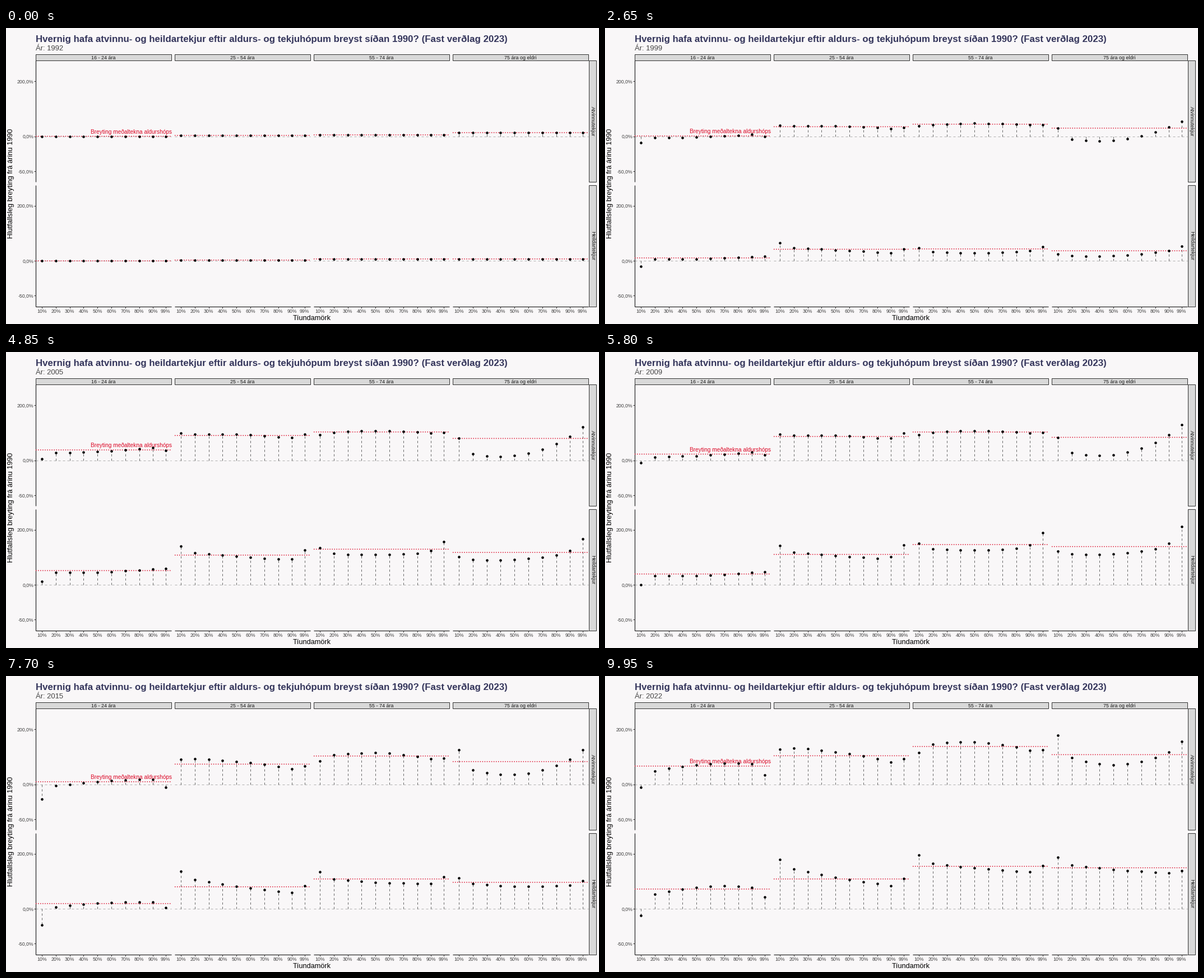
A matplotlib script that plays this animation: 1058x529 px, repeating every 10 s.

```python
import numpy as np
import matplotlib.pyplot as plt
from matplotlib.animation import FuncAnimation
from matplotlib.collections import LineCollection
from matplotlib.patches import Rectangle

W, H, DPI = 1058, 529, 72          # at 72 dpi one point is one pixel
FRAMES, INTERVAL = 200, 50
BG, RED, NAVY, GREY = "#f9f7f8", "#dc0a28", "#35365c", "#444444"

LEFT, PITCH, PANEL_W, PANEL_H = 53, 248, 242.4, 217
TOPS, ZEROS = (58, 281), (194, 416.2)
BOTTOM = TOPS[1] + PANEL_H
LOG_UNIT = 89.8                    # pixels per unit of ln(1 + change)
PCT = np.array([*range(10, 100, 10), 99])
DOT_X = 64 + 2.481 * (PCT - 10)
AGES = ("16 - 24 ára", "25 - 54 ára", "55 - 74 ára", "75 ára og eldri")
KINDS = ("Atvinnutekjur", "Heildartekjur")

plt.rcParams["font.family"] = "Liberation Sans"
fig = plt.figure(figsize=(W / DPI, H / DPI), dpi=DPI, facecolor=BG)
ax = fig.add_axes([0, 0, 1, 1])
ax.set_xlim(0, W)
ax.set_ylim(H, 0)
ax.axis("off")


def profile(low, p20, p50, p90, top):
    """Decile offsets from the mean: free ends, a parabola in between."""
    inner = np.polyfit([20, 50, 90], [p20, p50, p90], 2)
    y = np.polyval(inner, PCT)
    y[0], y[-1] = low, top
    return y


class Panel:
    """One facet: a mean over time and a decile shape that turns early to late."""
    KEYS = (0, 33, 75, 116, 154, 172, 199)

    def __init__(self, row, col, mean, early, late, surge=0):
        self.row, self.col, self.mean, self.surge = row, col, mean, surge
        self.early, self.late = profile(*early), profile(*late)
        self.x0, self.zero = LEFT + col * PITCH, ZEROS[row]
        self.x = DOT_X + col * PITCH

    def state(self, t):
        """Heights above the zero line in pixels: the mean, then the deciles."""
        swing = np.interp(t, [0, 14, 33, 75, 104, 116, 128, 154],
                          [0, -3, 0, 0, 9, 0, -8, 0])
        mean = np.interp(t, self.KEYS, self.mean)
        mean += swing * (1.2, 1, 1, .8)[self.col]
        late = np.interp(t, [116, 154, 199], [0, .6, 1])
        early = min(t / 75, 1) - late
        y = mean + early * self.early + late * self.late
        boom = max(0, 1 - abs(t - 116) / 40)
        y[-2:] += self.surge * boom * np.array([.25, 1])
        if self.col == 0:
            # the lowest young earners fall furthest in bad years
            dip = np.interp(t, [0, 21, 33, 116, 126, 154, 172, 188, 199],
                            [0, -18, -5, -5, -60, -15, 0, -53, -17])
            y[0] += dip * (.75, 1)[self.row]
        return mean, y


panels = [
    Panel(0, 0, (.5, -7, 10, 11.5, 5, 25.5, 33),
          (-12, -5, -3, 4, -1), (-25, -9, 2, 4, -16)),
    Panel(0, 1, (2, 4.5, 32, 43, 36.5, 48.5, 51.5),
          (4, 2, 2, -5, -2), (12, 14, 7, -11, -5), 8),
    Panel(0, 2, (3, 9, 36.5, 51, 51, 64.5, 68),
          (-5, -1, 2, -2, -1), (-11, 4, 8, -7, -6)),
    Panel(0, 3, (7, 5.5, 25.5, 41.5, 41, 50.5, 53.5),
          (0, -28, -31, 3, 17), (35, -6, -18, 4, 24), 6),
    Panel(1, 0, (0, -3.5, 15, 19.5, 9.5, 28, 35.5),
          (-14, -3, -3, 3, 4), (-30, -9, 3, 3, -14)),
    Panel(1, 1, (1.5, 6, 37, 54.5, 39.5, 51, 53.5),
          (16, 4, -2, -9, 0), (35, 18, 3, -12, 1), 17),
    Panel(1, 2, (3.5, 5, 39.5, 72, 53.5, 69.5, 76),
          (2, -8, -10, -5, 6), (20, 5, -3, -10, 1), 15),
    Panel(1, 3, (3.5, 3.5, 34, 68.5, 47.5, 69.5, 73.5),
          (-8, -13, -13, 0, 12), (19, 5, -3, -9, -5), 24),
]


def line(x, y, color="black", lw=1.0, **kw):
    ax.plot(x, y, color=color, lw=lw, solid_capstyle="butt",
            dash_capstyle="butt", **kw)


def strip(x, y, w, h, label, size, rotation=0):
    ax.add_patch(Rectangle((x, y), w, h, fc="#d9d9d9", ec="#333333", lw=1))
    va = "center" if rotation else "center_baseline"
    ax.text(x + w / 2, y + h / 2, label, size=size, color="#1a1a1a",
            ha="center", va=va, rotation=rotation)


# Fixed parts
ax.text(LEFT, 24.5, "Hvernig hafa atvinnu- og heildartekjur eftir aldurs- og "
        "tekjuhópum breyst síðan 1990? (Fast verðlag 2023)",
        size=16.87, weight="bold", color=NAVY)
ax.text(546, 522.5, "Tíundamörk", size=12.8, ha="center")
ax.text(9, 278, "Hlutfallsleg breyting frá árinu 1990", size=12.9,
        rotation=90, ha="center", va="center")

for col, age in enumerate(AGES):
    x0 = LEFT + col * PITCH
    x1 = x0 + PANEL_W
    strip(x0, 47, PANEL_W, 11, age, 8.9)
    line([x0, x1], [BOTTOM, BOTTOM])
    for zero in ZEROS:
        line([x0, x1], [zero, zero], "#b0b0b0", ls=(0, (4, 4)))
    for p, x in zip(PCT, DOT_X + col * PITCH):
        line([x, x], [BOTTOM, BOTTOM + 3], "#333333")
        ax.text(x, 509, f"{p}%", size=8.8, color=GREY, ha="center")

for kind, top, zero in zip(KINDS, TOPS, ZEROS):
    strip(1040, top, 13, PANEL_H, kind, 9.3, 270)
    line([LEFT, LEFT], [top, top + PANEL_H])
    for change in (200, 0, -50):
        y = zero - LOG_UNIT * np.log1p(change / 100)
        line([LEFT - 3, LEFT], [y, y], "#333333")
        ax.text(49, y + 3.2, f"{change},0%", size=8.8, color=GREY, ha="right")

# Moving parts
year = ax.text(LEFT, 40.5, "", size=13, color=GREY)
stems = LineCollection([], colors="#555555", linewidths=.9,
                       linestyles=[(0, (4.4, 4.4))], zorder=3)
means = LineCollection([], colors=RED, linewidths=1.5,
                       linestyles=[(0, (1, 1.7))], zorder=4)
means.set_snap(False)
ax.add_collection(stems, autolim=False)
ax.add_collection(means, autolim=False)
note = ax.text(296, 0, "Breyting meðaltekna aldurshóps", size=10.15,
               color=RED, ha="right", zorder=5)
dots, = ax.plot([], [], "o", color="black", ms=4.6, mew=0, zorder=6)
dots.set_snap(False)


def update(t):
    # seven frames a year up to 2006, then six
    now = 1992 + t // 7 if t < 98 else 2006 + (t - 98) // 6
    year.set_text(f"Ár: {now}")
    xs, ys, stem, mean = [], [], [], []
    for p in panels:
        level, h = p.state(t)
        y, m = p.zero - h, p.zero - level
        xs.extend(p.x)
        ys.extend(y)
        stem += [[(a, p.zero), (a, b)] for a, b in zip(p.x, y)]
        mean.append([(p.x0, m), (p.x0 + PANEL_W, m)])
    note.set_y(mean[0][0][1] - 4.6)
    dots.set_data(xs, ys)
    stems.set_segments(stem)
    means.set_segments(mean)
    return year, stems, means, note, dots


anim = FuncAnimation(fig, update, frames=FRAMES, interval=INTERVAL,
                     repeat=True, repeat_delay=0, blit=False)
plt.show()
```
